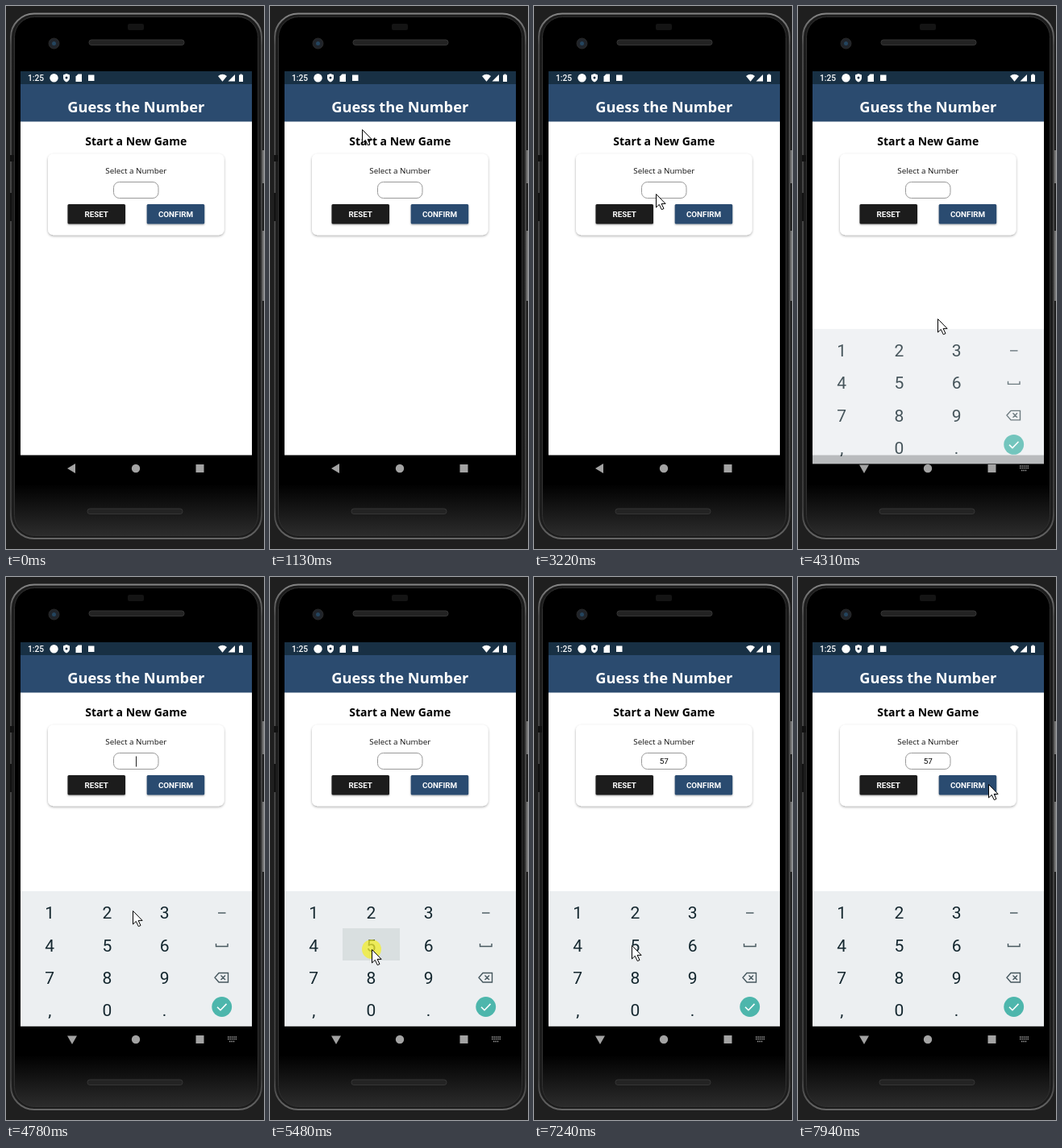
An HTML page that plays this animation: 320 px wide and 674 px high, repeating every 8000 ms.

```html
<!DOCTYPE html>
<html lang="en">
<head>
<meta charset="utf-8">
<title>Guess the Number</title>
<style>
  html, body { margin: 0; width: 100%; height: 100%; overflow: hidden; background: #1f1f1f; }
  svg { display: block; width: 100%; height: 100%; }
  text { text-anchor: middle; font-family: Roboto, sans-serif; }
  .sans { font-family: "Open Sans", sans-serif; }
  .bold { font-weight: 700; }
  .button { font-size: 9.8px; font-weight: 600; fill: #fff; }
  .key { font-size: 21px; fill: #14272f; }
</style>
</head>
<body>
<svg viewBox="0 0 320 674">
  <defs>
    <linearGradient id="rim" x2="0" y2="1">
      <stop offset="0" stop-color="#858585"/>
      <stop offset=".06" stop-color="#484848"/>
      <stop offset=".94" stop-color="#3c3c3c"/>
      <stop offset="1" stop-color="#666"/>
    </linearGradient>
    <linearGradient id="glass" x2="0" y2="1">
      <stop offset=".9"/>
      <stop offset="1" stop-color="#2c2c2c"/>
    </linearGradient>
    <filter id="shadow" x="-10%" y="-20%" width="120%" height="150%">
      <feDropShadow dx="0" dy="1.3" stdDeviation="1.5" flood-opacity=".34"/>
    </filter>
    <filter id="lift" x="-10%" y="-20%" width="120%" height="160%">
      <feDropShadow dx="0" dy="1" stdDeviation=".8" flood-opacity=".35"/>
    </filter>
    <rect id="plate" width="71.5" height="24.5" rx="1.5" filter="url(#lift)"/>
    <rect id="speaker" width="118" height="6.5" rx="3" fill="#232323" stroke="#353535"/>
  </defs>

  <!-- Phone body -->
  <path d="M316 179h4v41h-4zM316 279h4v87h-4z" fill="#777"/>
  <rect x="6" y="9.5" width="311" height="651.5" rx="29" fill="#1c1c1c" stroke="url(#rim)" stroke-width="2"/>
  <rect x="10.5" y="13.5" width="302" height="644" rx="25" fill="url(#glass)" stroke="#303030"/>
  <path d="M5 185h5v8H5zM5 232h2v35H5z" fill="#111"/>
  <rect x="151" y="22" width="20" height="8" rx="2" fill="#141414"/>
  <use href="#speaker" x="103" y="42"/>
  <use href="#speaker" x="101" y="624"/>
  <circle cx="59.5" cy="46.5" r="6.5" fill="#20242a" stroke="#292929"/>
  <circle cx="59.5" cy="46.5" r="2.5" fill="#24445e"/>

  <!-- App -->
  <rect x="18" y="81" width="287" height="476.5" fill="#fff"/>
  <rect x="18" y="97" width="287" height="46.5" fill="#2b4b6f"/>
  <rect x="18" y="81" width="287" height="16" fill="#183044"/>
  <g fill="#fff">
    <text x="37" y="93" font-size="10.2" font-weight="500">1:25</text>
    <circle cx="59.5" cy="89.2" r="5.2"/>
    <path d="M75 84l4 1.5v3.5q0 3.7-4 5.5q-4-1.8-4-5.5v-3.5z"/>
    <circle cx="75" cy="89" r="1.5" fill="#183044"/>
    <path d="M89.5 84.5h4.5v9.5h-7.5v-6.5z"/>
    <rect x="102" y="85.5" width="7.5" height="7.5"/>
    <path d="M263 87q5.500-4.500 11 0l-5.500 6.700z"/>
    <path d="M284 85v8.500h-8.500z"/>
    <path d="M290.500 84.500h2v1h1.500v8.500h-5v-8.500h1.500z"/>
  </g>
  <text class="sans bold" x="161.300" y="131.500" font-size="18.300" fill="#fff">Guess the Number</text>
  <text class="sans bold" x="161.300" y="173" font-size="14">Start a New Game</text>
  <rect x="52" y="183.500" width="218.500" height="100.700" rx="7" fill="#fff" filter="url(#shadow)"/>
  <text class="sans" x="161.300" y="208" font-size="9.850" fill="#111">Select a Number</text>
  <rect x="133.500" y="218.500" width="55.500" height="20" rx="7" fill="#fff" stroke="#999"/>
  <text id="entry" x="161.300" y="232.300" font-size="9.800"></text>
  <rect id="caret" y="222.500" width="1" height="13" fill="#222"/>
  <use href="#plate" x="76.500" y="246" fill="#1c1b1c"/>
  <use href="#plate" x="174.700" y="246" fill="#2b4b6f"/>
  <text class="button" x="112.200" y="262">RESET</text>
  <text class="button" x="210.500" y="262">CONFIRM</text>

  <!-- Navigation bar -->
  <g fill="#a3a3a3">
    <path id="back" d="M76 574l10-6v12z"/>
    <g id="typingNav">
      <path d="M76 569.500h12l-6 10.500z"/>
      <path d="M275 571h11M275 573.500h11M277 576.500h7" stroke="#a3a3a3" stroke-width="1.300" stroke-dasharray="1.400 1"/>
    </g>
    <circle cx="161" cy="574" r="5.200"/>
    <rect x="235.500" y="569" width="10" height="10"/>
  </g>

  <!-- Keyboard -->
  <g id="keyboard">
    <rect x="18" y="390" width="287" height="167.500" fill="#eceff1"/>
    <rect id="pressed" x="90" y="436" width="71" height="40" fill="#d9dfe0"/>
    <g id="keys"></g>
    <g fill="none" stroke="#46575e" stroke-width="1.400">
      <path d="M263 417h9.500"/>
      <path d="M260.500 455v3.500h14.500v-3.500"/>
      <path d="M264 491.500h11.500v11.500h-11.500l-5-5.750zM266.500 494.500l5.500 5.500m0-5.500l-5.500 5.500"/>
    </g>
    <circle cx="267.700" cy="533.500" r="12.400" fill="#4db6ac"/>
    <path d="M262 533.700l4 4l7.500-7.800" fill="none" stroke="#fff" stroke-width="1.600"/>
  </g>

  <g id="pointer">
    <circle id="click" r="12" fill="#f3ef2c" fill-opacity=".75"/>
    <path d="M.5.500v16.500l3.800-3.600l3 6.300l2.700-1.200l-2.900-6.100h5z" fill="#fff" stroke="#000"/>
  </g>
</svg>
<script>
const LOOP = 8000;
const RESPONSE = 110;   // delay between a tap and its effect
const BLINK = 500;
const POINTER_IN = 590, NAV_CHANGE = 3680, KEYBOARD_IN = 4310, SLIDE = 160;

const taps = [
  { at: 3450, entry: '' },
  { at: 5480, entry: '5' },
  { at: 6320, entry: '57' }
];

// Places the pointer visits, with arrival times
const stops = [
  { at: POINTER_IN, x: 270, y: 656 },
  { at: 1080, x: 120, y: 140 },
  { at: 1360, x: 54, y: 290 },
  { at: 2050, x: 246, y: 251 },
  { at: 2590, x: 133, y: 288 },
  { at: 3220, x: 151, y: 233, rest: 230 },
  { at: 4010, x: 173, y: 388, rest: 460 },
  { at: 5250, x: 126, y: 462, rest: 350 },
  { at: 6250, x: 55, y: 496, rest: 150 },
  { at: 6550, x: 65, y: 487 },
  { at: 7090, x: 111, y: 475 },
  { at: 7940, x: 236, y: 257 }
];

const $ = id => document.getElementById(id);
const show = (id, visible) => $(id).setAttribute('visibility', visible ? 'visible' : 'hidden');
const clamp = k => Math.min(1, Math.max(0, k));
const smooth = k => k * k * (3 - 2 * k);

['123', '456', '789', ',0.'].forEach((row, r) => [...row].forEach((label, c) => {
  const key = document.createElementNS('http://www.w3.org/2000/svg', 'text');
  key.setAttribute('class', 'key');
  key.setAttribute('x', 54.2 + 71.2 * c);
  key.setAttribute('y', 424.3 + 40.3 * r);
  key.textContent = label;
  $('keys').append(key);
}));

function pointerAt(t) {
  const to = stops.find(stop => stop.at > t) ?? stops.at(-1);
  const from = stops[Math.max(0, stops.indexOf(to) - 1)];
  const leave = from.at + (from.rest ?? 0);
  const k = smooth(clamp((t - leave) / (to.at - leave)));
  return ['x', 'y'].map(axis => Math.round(from[axis] + (to[axis] - from[axis]) * k));
}

function draw(t) {
  $('pointer').setAttribute('transform', `translate(${pointerAt(t)})`);
  $('pointer').setAttribute('opacity', t < POINTER_IN ? 0 : 1);

  const clicking = taps.find(({ at }) => t >= at && t < at + RESPONSE);
  show('click', clicking);
  show('pressed', clicking?.entry === '5');

  const last = taps.findLast(({ at }) => t >= at + RESPONSE);
  const entry = last?.entry ?? '';
  $('entry').textContent = entry;
  $('caret').setAttribute('x', 161 + 2.8 * entry.length);
  show('caret', last && (t - last.at - RESPONSE) % (2 * BLINK) < BLINK);

  show('back', t < NAV_CHANGE);
  show('typingNav', t >= NAV_CHANGE);

  const offset = 11 * (1 - clamp((t - KEYBOARD_IN) / SLIDE)) ** 2;
  $('keyboard').setAttribute('transform', `translate(0 ${offset})`);
  $('keyboard').setAttribute('opacity', 1 - offset / 50);
  show('keyboard', t >= KEYBOARD_IN);
  if (t < KEYBOARD_IN) show('pressed', false);
}

const start = performance.now();
function tick() {
  draw((performance.now() - start) % LOOP);
  requestAnimationFrame(tick);
}
tick();
</script>
</body>
</html>
```
